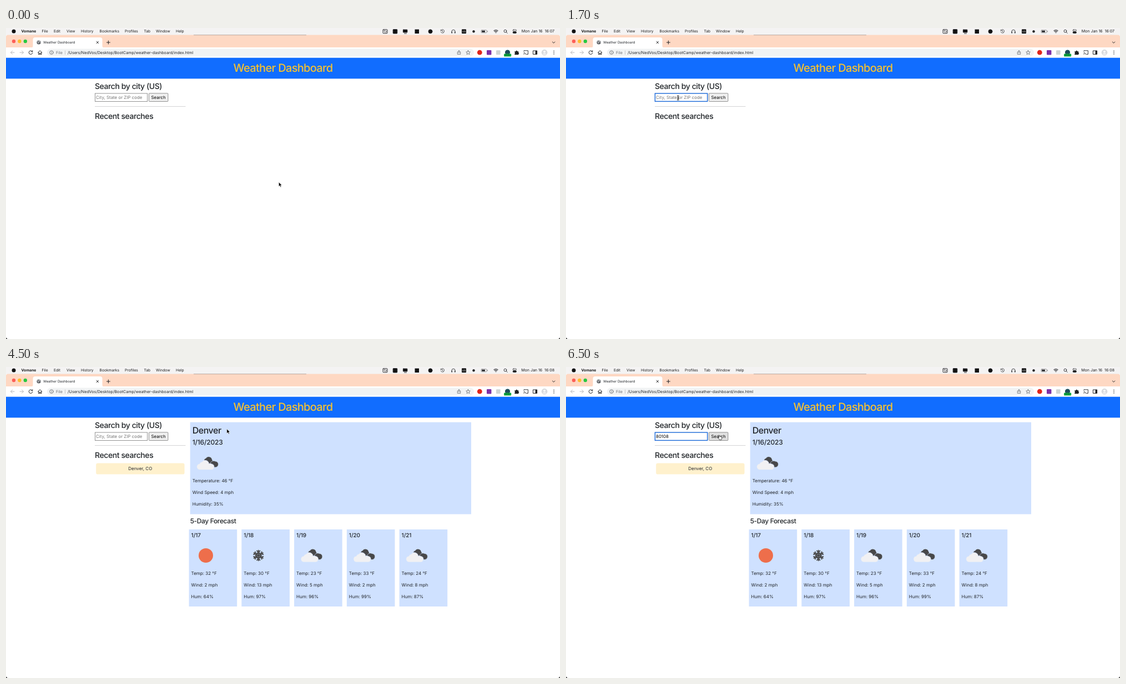
An HTML page for the animation above (8 s loop, 998 px wide and 561 px high).

```html
<!DOCTYPE html>
<html lang="en">
<head>
<meta charset="utf-8">
<title>Weather Dashboard</title>
<style>
  html, body { margin: 0; width: 100%; height: 100%; overflow: hidden; background: #fff; }
  svg { display: block; width: 100%; height: 100%; }
  text { font-family: Inter, "Liberation Sans", sans-serif; font-size: 8px; fill: #212529; white-space: pre; text-rendering: geometricPrecision; }
  .menu text { font-size: 6.7px; fill: #1b1b1b; }
  .head { font-weight: 500; letter-spacing: -.03em; }
  .line { fill: none; stroke: #202124; stroke-width: 1; stroke-linecap: round; stroke-linejoin: round; }
  .card { fill: #cfe1ff; }
</style>
</head>
<body>
<svg xmlns="http://www.w3.org/2000/svg">
  <defs>
    <g id="cloud">
      <g fill="#484849">
        <path d="M13 7a4 4 0 0 1 3-4 6 6 0 0 1 11 2 5 5 0 0 1 1 5l-7 5z"/>
        <path d="M23 14a4 4 0 0 1 2-4 6 6 0 0 1 8-2 5 5 0 0 1 0 11H27z" stroke="#cfe1ff" stroke-width=".7"/>
      </g>
      <path d="M5.5 23.5a5.5 5.5 0 0 1-.7-11 5 5 0 0 1 4.2-3.5 7 7 0 0 1 12.6 3.6 5.5 5.5 0 0 1 5 .3 5.4 5.4 0 0 1 0 10.6z" fill="#f1f1f3" stroke="#cfe1ff" stroke-width=".7"/>
    </g>
    <circle id="sun" cx="18" cy="11.5" r="13" fill="#ee6e4b"/>
    <g id="snow" class="line" style="stroke:#484849;stroke-width:1.9"></g>
  </defs>

  <rect width="998" height="561" fill="#fff"/>

  <!-- menu bar -->
  <g class="menu">
    <rect width="998" height="13" fill="#f4f3f3"/>
    <circle cx="14" cy="6" r="3.5" fill="#111"/>
    <text x="27.5" y="8.4" font-weight="700">Vomane</text>
    <g id="menus"></g>
    <text id="clock" x="988" y="8.4" text-anchor="end" style="font-size:7px"></text>
  </g>
  <g class="line" style="stroke-width:.9">
    <rect x="679" y="2.7" width="8" height="7" rx="1"/><path d="M681 4.5h2M681 6.4l2 1.4M685 5v3"/>
    <rect x="697.2" y="2.5" width="7.6" height="7.5" rx="1" fill="#111"/>
    <rect x="715.4" y="3" width="7.5" height="5" rx=".6" fill="#111"/><path d="M717.5 10h4"/>
    <rect x="736.5" y="2.5" width="7.5" height="7.5" fill="#111" stroke="none"/>
    <circle cx="764.5" cy="6.2" r="3.5" fill="#111"/>
    <path d="M783.6 4.2a3.2 3.2 0 1 1-.3 2.7M786.3 4.3v2.2l1.4.8M783.2 3.2v1.5h1.6" stroke-width=".7"/>
    <path d="M803 8V6.2a3 3 0 0 1 6 0V8" stroke-width=".8"/><path d="M803.2 7.2v1.8M808.8 7.2v1.8" stroke-width="1.4"/>
    <rect x="821" y="2.3" width="8" height="7.6" rx="1" fill="#111" stroke="none"/>
    <circle cx="842.5" cy="6.2" r="2.2" fill="#222" stroke="none"/>
    <rect x="856" y="3.7" width="10" height="5" rx="1.3" stroke="#777" stroke-width=".7"/>
    <path d="M857.2 6.2h5.7" stroke-width="3" stroke-linecap="butt"/><path d="M867.4 5.5v1.4" stroke="#777" stroke-width=".8"/>
    <path d="M879 5a5 5 0 0 1 7 0M880.4 6.7a3 3 0 0 1 4.2 0M882.1 8.4h.8" stroke-width="1.1"/>
    <circle cx="899.4" cy="5.6" r="2.4"/><path d="M901.2 7.4l2 2"/>
    <rect x="913" y="3" width="6.5" height="2.6" rx="1.3" stroke-width=".7"/>
    <rect x="913" y="6.8" width="6.5" height="2.6" rx="1.3" fill="#111" stroke-width=".7"/>
  </g>
  <text x="825" y="7.8" text-anchor="middle" style="font-size:4.6px;fill:#fff">US</text>

  <!-- browser frame -->
  <path d="M0 561V16q0-3.5 3.5-3.5h991q3.5 0 3.5 3.5v20H0z" fill="#fed8c3"/>
  <path d="M338 12.6h203" stroke="#8d8582" stroke-width=".6"/>
  <circle cx="14" cy="24" r="3.2" fill="#fe5f57"/>
  <circle cx="24.4" cy="24" r="3.2" fill="#febc2e"/>
  <circle cx="34.8" cy="24" r="3.2" fill="#28c840"/>
  <path d="M45 35.5q3.5 0 3.5-3.5V21q0-4 4-4h117q4 0 4 4v11q0 3.5 3.5 3.5z" fill="#fff"/>
  <rect y="35" width="998" height="19" fill="#fff"/>
  <circle cx="59" cy="26" r="3.6" fill="#5f6368"/>
  <path d="M56.5 24.5l2 1.2-.4 2M60 23l-.4 1.6 2 1" fill="none" stroke="#fff" stroke-width=".9"/>
  <text x="67" y="28.3" style="font-size:6.1px">Weather Dashboard</text>
  <path class="line" d="M163 24.2l3.6 3.6m0-3.6l-3.6 3.6M181.4 26h6M184.4 23v6M984.4 25l2.2 2.2 2.2-2.2"/>

  <rect x="74" y="37.6" width="769" height="13.2" rx="6.6" fill="#f1f3f4"/>
  <path class="line" style="stroke:#b5b7ba" d="M15 44.2H8.5m3-3l-3 3 3 3M25 44.2h6.5m-3-3l3 3-3 3"/>
  <path class="line" d="M47.2 42.2a3.3 3.3 0 1 0 .6 2.8M47.8 40.8v2h-2M57.5 44.4l3.7-3.6 3.7 3.6M58.7 43.8v4h1.7v-2.4h1.6v2.4h1.7v-4"/>
  <g class="line" style="stroke:#5f6368;stroke-width:.8">
    <circle cx="82" cy="44.2" r="3.3"/><path d="M82 44v1.8M82 42.4v.1"/>
    <path d="M106.5 41v6.5" stroke="#bbb"/>
    <path d="M814.6 43.2h-1.3v4.2h5.4v-4.2h-1.3M816 45.2v-4.5m-1.4 1.4l1.4-1.4 1.4 1.4"/>
    <path d="M832.5 40.5l1.1 2.5 2.7.2-2 1.8.6 2.7-2.4-1.4-2.4 1.4.6-2.7-2-1.8 2.7-.2z"/>
  </g>
  <text x="90" y="46.7" style="font-size:7.15px;fill:#6b6f74">File</text>
  <text x="111" y="46.7" style="font-size:7.15px">/Users/NedVos/Desktop/BootCamp/weather-dashboard/index.html</text>

  <circle cx="853.3" cy="44.2" r="4.4" fill="#e1251b"/>
  <rect x="866" y="40" width="8.4" height="8.4" rx="1" fill="#7d2fa8"/>
  <rect x="883" y="40.2" width="7.6" height="8" rx="1" fill="#d0d5d4"/>
  <circle cx="903.5" cy="44" r="4.6" fill="#1d4e5c"/>
  <rect x="897" y="46.6" width="13.2" height="4.8" rx="1" fill="#12b347"/>
  <text x="903.6" y="50.4" text-anchor="middle" style="font-size:3.8px;fill:#073b18">NEW!</text>
  <path d="M916.3 42.2h2.2a1.4 1.4 0 0 1 2.8 0h2v2.2a1.4 1.4 0 0 1 0 2.6v1.3h-7v-2a1.4 1.4 0 0 0 0-2.4z" fill="#202124"/>
  <path class="line" d="M933 42.2v-1.4h7.4v6.6h-3M933 44.3a3.2 3.2 0 0 1 3 3.1M933 46.4v1" style="stroke-width:.9"/>
  <rect class="line" x="949.8" y="41" width="6.8" height="6.4"/><path d="M953.6 41h3v6.4h-3z" fill="#202124"/>
  <circle cx="970" cy="44.2" r="5.4" fill="#d9dbde"/>
  <circle cx="970" cy="42.8" r="1.9" fill="#fff"/><path d="M966.6 47.6a3.6 2.8 0 0 1 6.8 0z" fill="#fff"/>
  <path class="line" style="stroke-width:1.5" d="M987 41.4v.01M987 44.2v.01M987 47v.01"/>

  <!-- page -->
  <rect y="53.7" width="998" height="37.7" fill="#116dff"/>
  <text class="head" x="499" y="78.7" text-anchor="middle" style="font-size:20px;letter-spacing:-.034em;fill:#f6c12f">Weather Dashboard</text>
  <text class="head" x="160" y="109.6" style="font-size:14px">Search by city (US)</text>
  <rect id="field" x="160.4" y="118" width="94.3" height="14.4" fill="#fff"/>
  <text id="entry" x="162" y="128.4" style="font-size:7.9px"></text>
  <rect id="button" x="257.4" y="117.8" width="34.5" height="14.7" rx="1" stroke="#777" stroke-width=".8"/>
  <text x="274.6" y="128.4" text-anchor="middle" style="font-size:7.9px;fill:#000">Search</text>
  <path d="M160 141.5h163.5" stroke="#c9cacb" stroke-width=".8"/>
  <text class="head" x="160" y="164.4" style="font-size:14px">Recent searches</text>

  <g id="report">
    <rect x="162.2" y="173.6" width="159.4" height="20" rx="3.2" fill="#fff1cd"/>
    <text x="241.8" y="186.4" text-anchor="middle">Denver, CO</text>
    <rect class="card" x="331.7" y="99.6" width="506.3" height="165.9"/>
    <text class="head" x="335.7" y="120.3" style="font-size:16px">Denver</text>
    <text class="head" x="335.7" y="139.8" style="font-size:12px;letter-spacing:-.015em">1/16/2023</text>
    <use href="#cloud" x="344" y="162"/>
    <text x="335.7" y="208.2">Temperature: 46 °F</text>
    <text x="335.7" y="229">Wind Speed: 4 mph</text>
    <text x="335.7" y="249.8">Humidity: 35%</text>
    <text class="head" x="331.7" y="281.7" style="font-size:12px">5-Day Forecast</text>
    <g id="days"></g>
  </g>

  <path d="M0 557q0 4 4 4H0zM998 557q0 4-4 4h4z" fill="#000"/>

  <!-- pointers, each drawn around its hot spot -->
  <g id="arrow"><path d="M0 0v8l1.9-1.7 1.3 2.9 1.4-.6-1.3-2.8h2.5z" fill="#000" stroke="#fff" stroke-width=".6"/></g>
  <g id="beam"><path d="M-1.7-4.3q1.7 0 1.7 1.4v5.8q0 1.4-1.7 1.4M1.7-4.3q-1.7 0-1.7 1.4v5.8q0 1.4 1.7 1.4M-1 1H1" fill="none" stroke="#111" stroke-width=".9"/></g>
  <g id="hand"><path d="M-1.6-3.6q.8-.8 1.5.2l.8 2q.9-.5 1.3.1.9-.4 1.3.3.9-.2 1.1.7.3 1.7-.2 2.9l-.5 1.6h-3.6q-.6-1.3-1.9-2.4-1-1-.1-1.4.6-.2 1.2.4z" fill="#fff" stroke="#111" stroke-width=".7" stroke-linejoin="round"/></g>
</svg>
<script>
const byId = id => document.getElementById(id);
const label = (x, y, str, attrs = '') => `<text x="${x}" y="${y}" ${attrs}>${str}</text>`;

const menus = [['File', 64.5], ['Edit', 86], ['View', 109], ['History', 135], ['Bookmarks', 168.5],
  ['Profiles', 214], ['Tab', 248.5], ['Window', 270], ['Help', 306]];
byId('menus').innerHTML = menus.map(([name, x]) => label(x, 8.4, name)).join('');

byId('snow').innerHTML = [0, 60, 120, 180, 240, 300].map(a =>
  `<path transform="translate(18 11.5) rotate(${a})" d="M0 0v-9.3M-2.7-8.4L0-5.8 2.7-8.4M-2-4.6L0-2.8 2-4.6"/>`).join('');

const days = [['1/17', 'sun', 32, 2, 64], ['1/18', 'snow', 30, 13, 97], ['1/19', 'cloud', 23, 5, 96],
  ['1/20', 'cloud', 33, 2, 99], ['1/21', 'cloud', 24, 8, 87]];
byId('days').innerHTML = days.map(([date, icon, temp, wind, hum], i) =>
  `<g transform="translate(${329.6 + 94.75 * i} 293)">
    <rect class="card" width="86.6" height="139"/>
    ${label(4, 14, date, 'class="head" style="font-size:10px;letter-spacing:-.01em"')}
    <use href="#${icon}" x="12.4" y="35.5"/>
    ${label(4, 82, `Temp: ${temp} °F`)}
    ${label(4, 102.8, `Wind: ${wind} mph`)}
    ${label(4, 123.5, `Hum: ${hum}%`)}
  </g>`).join('');

const LOOP = 8000;
const scenes = [
  { at: 0, pointer: 'arrow', x: 491.3, y: 278 },
  { at: 500, pointer: 'beam', x: 201.8, y: 126, focus: true },
  { at: 2500, pointer: 'hand', x: 275.5, y: 127, focus: true, typed: 'Denver, CO' },
  { at: 4500, pointer: 'arrow', x: 397.8, y: 111.8, report: true },
  { at: 6500, pointer: 'hand', x: 276.3, y: 127, focus: true, typed: '80108', report: true }
];

function draw(time) {
  const s = scenes.findLast(scene => time >= scene.at);
  for (const id of ['arrow', 'beam', 'hand']) {
    const el = byId(id);
    el.style.display = id === s.pointer ? '' : 'none';
    el.setAttribute('transform', `translate(${s.x} ${s.y})`);
  }
  byId('clock').textContent = s.report ? 'Mon Jan 16  16:08' : 'Mon Jan 16  16:07';
  byId('entry').textContent = s.typed || 'City, State or ZIP code';
  byId('entry').style.fill = s.typed ? '#000' : '#757575';
  byId('field').setAttribute('stroke', s.focus ? '#1a68d8' : '#777');
  byId('field').setAttribute('stroke-width', s.focus ? 1.4 : .8);
  byId('button').setAttribute('fill', s.pointer === 'hand' ? '#e0e0e0' : '#efefef');
  byId('report').style.display = s.report ? '' : 'none';
}

function tick() {
  draw(performance.now() % LOOP);
  requestAnimationFrame(tick);
}
tick();
</script>
</body>
</html>
```
